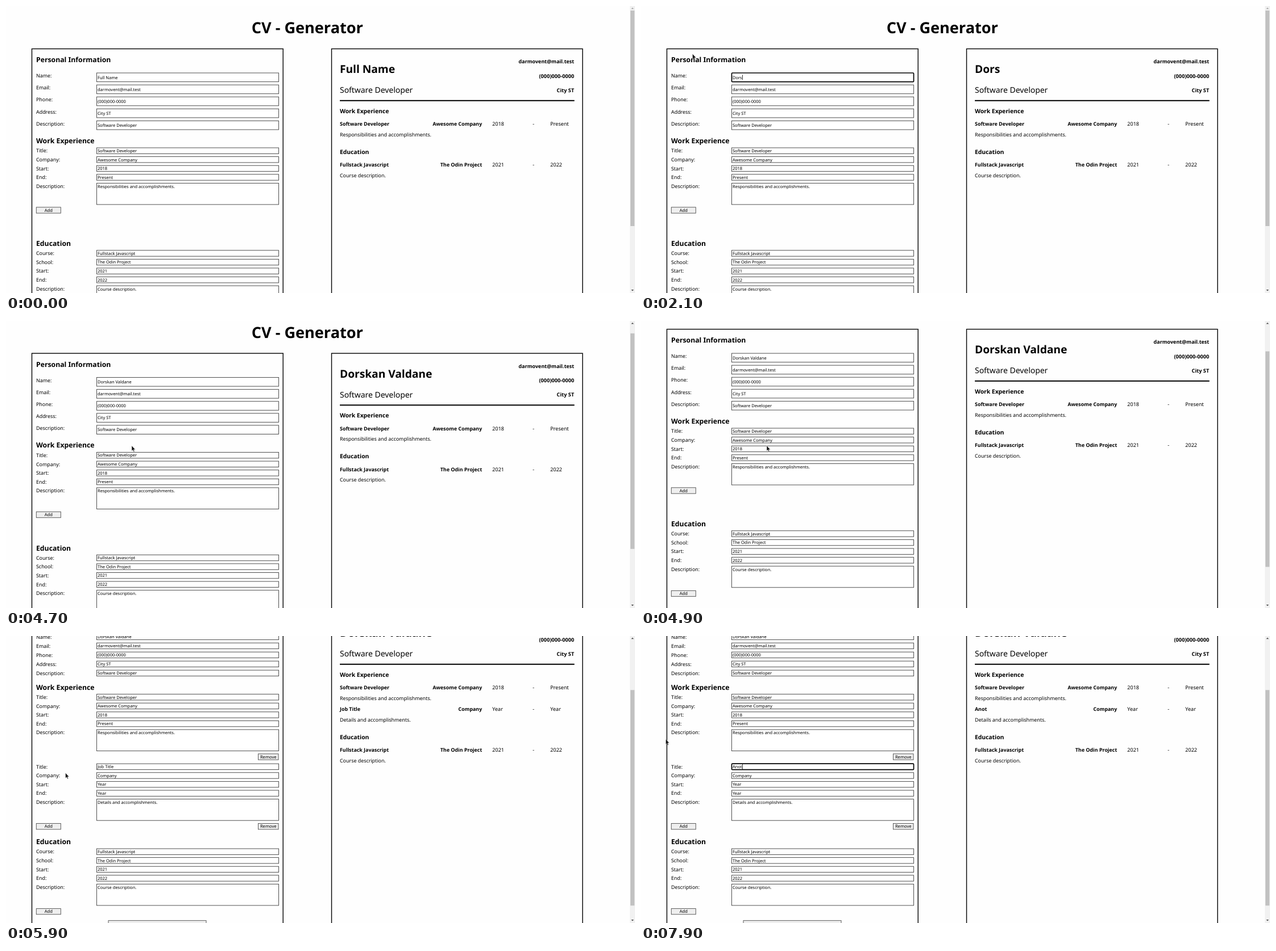
An HTML page that plays this animation: 1106x506 px, repeating every 8 s.

```html
<!DOCTYPE html>
<html lang="en">
<head>
<meta charset="utf-8">
<title>CV - Generator</title>
<style>
  html, body { margin: 0; width: 100%; height: 100%; overflow: hidden; background: #fefefe; }
  svg { display: block; width: 1106px; height: 506px; }
  text { font-family: "Noto Sans", "Open Sans", sans-serif; text-rendering: geometricPrecision; white-space: pre; }
  .panel { fill: none; stroke: #000; stroke-width: 1.4; }
  .field { fill: #fff; stroke: #3c3c3c; stroke-width: .9; }
  .focus { fill: #fff; stroke: #000; stroke-width: 1.7; }
  .button { fill: #efefef; stroke: #4c4c4c; stroke-width: .9; }
</style>
</head>
<body>
<svg id="stage" viewBox="0 0 1106 506"></svg>
<script>
const LOOP = 8000, BEAT = 100;
const INPUT = 7.5, BODY = 8.9;
const stage = document.getElementById('stage');
const pen = document.createElement('canvas').getContext('2d');

const person = 'Dorskan Valdane', email = 'darmovent@mail.test', phone = '(000)000-0000';
const role = 'Software Developer', city = 'City ST';
const nameKeys = [1500, 1900, 2000, 2100, 2300, 2400, 2500, 2600, 2800, 3000, 3200, 3300, 3400, 3500, 3600];
const titleKeys = [7400, 7600, 7800, 7900];

// [time, scroll offset]
const scrolls = [[0, 0], [4700, 18.5], [4800, 52], [4900, 61], [5000, 79], [5100, 113], [5200, 122], [5800, 117]];

// [time, x, y, text pointer]; no x means hidden
const pointer = [
  [0], [300, 350, 118, 1], [400, 352, 118, 1], [500, 353, 118, 1],
  [700, 310, 118, 1], [800, 220, 115, 1], [900, 140, 98], [1000, 97, 87], [1200, 90, 84], [3200],
  [4000, 144, 130], [4100, 180, 190], [4200, 208, 231], [4400, 216, 225], [4500, 220.5, 219.5],
  [5200, 200, 222], [5300, 150, 232], [5400, 108, 239], [5500, 92, 241], [5600, 90, 239.5],
  [5900, 104, 241], [6000, 132, 240], [6100, 160, 237], [6200, 184, 227, 1], [6300, 198, 225, 1],
  [6400, 202, 225, 1], [6600, 100, 214], [6700, -2, 196], [7000, 14, 191], [7100, 43, 181.5]
];

const at = (list, t) => list.filter(k => k[0] <= t).pop();
const typed = (text, keys, t) => text.slice(0, keys.filter(k => k <= t).length);

function widthOf(s) {
  pen.font = INPUT + 'px "Noto Sans", "Open Sans", sans-serif';
  return pen.measureText(s).width;
}

const text = (x, y, s, size = BODY, bold = false, anchor = 'start', fill = '#000') =>
  `<text x="${x}" y="${y}" font-size="${size}" font-weight="${bold ? 700 : 400}" text-anchor="${anchor}" fill="${fill}">${s}</text>`;

const rect = (x, y, w, h, attrs) => `<rect x="${x}" y="${y}" width="${w}" height="${h}" ${attrs}/>`;

const button = (x, y, w, h, s) =>
  rect(x, y, w, h, 'class="button"') + text(x + w / 2, y + h / 2 + 2.7, s, 7.6, false, 'middle');

const heading = (y, s) => text(53, y, s, 12.25, true);

// Text box with optional focus ring, caret or selection
function field(y, h, s, { focus, caret, selected } = {}, base = y + h / 2 + 2.7) {
  let out = rect(159.5, y, 320, h, focus ? 'class="focus" rx="1.2"' : 'class="field"');
  if (selected) out += rect(161, base - 7.3, widthOf(s) + .5, 9.2, 'fill="#b4533c"');
  out += text(161, base, s, INPUT, false, 'start', selected ? '#fff' : '#000');
  if (caret) out += rect(161.3 + widthOf(s), base - 7.2, .8, 9, 'fill="#000"');
  return out;
}

function personal(tall, name, nameState) {
  const rows = [['Name:', name], ['Email:', email], ['Phone:', phone], ['Address:', city], ['Description:', role]];
  const [top, pitch, h, drop] = tall ? [118, 21.1, 15.6, 8.2] : [113.2, 16, 10.4, 8.4];
  return rows.map(([label, s], i) => {
    const y = top + i * pitch;
    return text(53, y + drop, label) + field(y, h, s, i ? {} : nameState);
  }).join('');
}

// y is the centre of the first row
function entry(y, labels, values, firstState) {
  return [...labels, 'Start:', 'End:', 'Description:'].map((label, i) => {
    const c = y + i * 15.6;
    const box = i < 4 ? field(c - 5.2, 10.4, values[i], i ? {} : firstState)
                      : field(c - 5.2, 37.6, values[i], {}, c + 3.2);
    return text(53, c + 3.2, label) + box;
  }).join('');
}

// y is the baseline of the bold line
const cvEntry = (y, [title, place, start, end, details]) =>
  text(587, y, title, BODY, true) + text(837, y, place, BODY, true, 'end') +
  text(855, y, start, 9.1) + text(926, y, '-', 9.1) + text(957, y, end, 9.1) +
  text(587, y + 18.3, details);

function scrollbar(offset) {
  return rect(1097, 0, 9, 506, 'fill="#f1f1f1"') +
    rect(1098, 8 + offset * .746, 7, 380, 'fill="#c1c1c1"') +
    `<path d="M1099.3 5.3h4.6l-2.3-2.6z" fill="${offset ? '#505050' : '#a3a3a3'}"/>` +
    '<path d="M1099.3 500h4.6l-2.3 2.6z" fill="#505050"/>';
}

function cursor([, x, y, beam]) {
  if (x === undefined) return '';
  const shape = beam
    ? '<path d="M-2 .5h1.5L0 1l.5-.5H2M0 1v9M-2 10.5h1.5L0 10l.5.5H2" fill="none" stroke="#000" stroke-width=".8"/>'
    : '<path d="M.5.3v9.4l2.1-1.9 1.4 3.1 1.5-.7-1.4-3h2.8z" fill="#111" stroke="#fff" stroke-width=".5"/>';
  return `<g transform="translate(${x} ${y})">${shape}</g>`;
}

function draw(t) {
  const offset = at(scrolls, t)[1];
  const two = t >= 5800;
  const name = typed(person, nameKeys, t) || 'Full Name';
  const nameState = {
    focus: t >= 700 && t < 4400,
    selected: t >= 900 && t < 1500,
    caret: t >= 1500 && t < 4000
  };
  const title = typed('Another Job', titleKeys, t) || 'Job Title';
  const titleState = { focus: t >= 6600, selected: t >= 6600 && t < 7400, caret: t >= 7400 };

  const job = [role, 'Awesome Company', '2018', 'Present', 'Responsibilities and accomplishments.'];
  const extra = [title, 'Company', 'Year', 'Year', 'Details and accomplishments.'];
  const course = ['Fullstack Javascript', 'The Odin Project', '2021', '2022', 'Course description.'];
  const jobLabels = ['Title:', 'Company:'], courseLabels = ['Course:', 'School:'];

  let form = heading(99.3, 'Personal Information') + personal(!two, name, nameState);
  const workY = two ? 224.8 : 255.2;
  const addY = two ? 447.5 : 354.8;
  const eduY = two ? 497.2 : 436;
  form += heading(workY - 13.3, 'Work Experience') + entry(workY, jobLabels, job);
  if (two) {
    form += button(443.5, 324.8, 35.5, 10.4, 'Remove') +
      entry(347.4, jobLabels, extra, titleState) + button(443.5, addY, 35.5, 10.4, 'Remove');
  }
  form += button(53.3, addY, 43, 10.4, 'Add') +
    heading(eduY - 12.9, 'Education') + entry(eduY, courseLabels, course) +
    button(53.3, eduY + 100.4, 43, 10.2, 'Add') +
    button(180, eduY + (two ? 121.5 : 151), 172, 17.6, 'Download PDF');

  const shift = two ? 38 : 0;
  const cv = text(587, 118, name, 19.15, true) + text(587, 153, role, 13.92) +
    text(999, 101.3, email, 9, true, 'end') + text(999, 126.5, phone, 9.2, true, 'end') +
    text(999, 151.8, city, 9.2, true, 'end') +
    rect(587, 165.8, 412.5, 2, '') +
    text(587, 188.8, 'Work Experience', 10.3, true) + cvEntry(211.3, job) +
    (two ? cvEntry(249.3, extra) : '') +
    text(587, 260.8 + shift, 'Education', 10.3, true) + cvEntry(283.3 + shift, course);

  stage.innerHTML = `<g transform="translate(0 ${-offset})">` +
    text(529.8, 48.2, 'CV - Generator', 27.1, true, 'middle') +
    rect(45.5, 75.5, 441.7, 700, 'class="panel"') + rect(572.5, 75.5, 441.3, 700, 'class="panel"') +
    form + cv + '</g>' + scrollbar(offset) + cursor(at(pointer, t));
}

let shown = -1;
function tick() {
  const t = Math.floor(performance.now() % LOOP / BEAT) * BEAT;
  if (t !== shown) draw(shown = t);
  requestAnimationFrame(tick);
}
tick();
</script>
</body>
</html>
```
